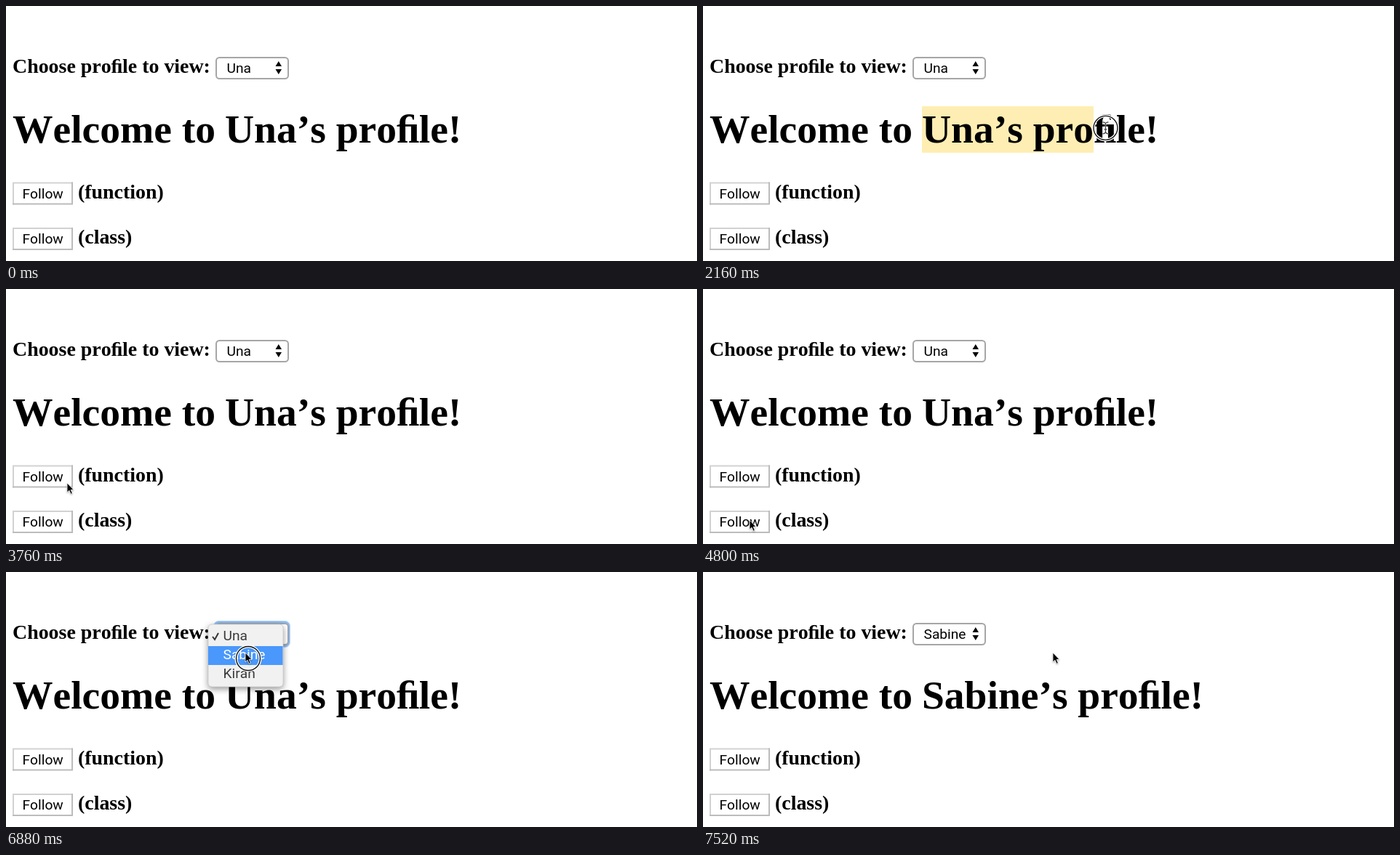
Recreate the animation shown at these times as an HTML page. Size 950 by 351 pixels, loop 8000 ms.

```html
<!DOCTYPE html>
<html lang="en">
<head>
<meta charset="utf-8">
<title>Profile page</title>
<style>
html, body { margin: 0; width: 100%; height: 100%; overflow: hidden; background: #fff; }
svg { display: block; }
text { font-kerning: none; }
.serif { font: bold 27.9px "Liberation Serif", Times, serif; }
.serif .title { font-size: 55.5px; }
.sans { font: 19.2px Roboto, Arial, sans-serif; }
.line { fill: none; stroke-width: 2; }
.glow { fill: #86bdfc; stroke: #b4d6fd; }
#menu { filter: drop-shadow(0 3px 4px #0006); }
#arrow { filter: drop-shadow(0 1px 1px #0005); }
</style>
</head>
<body>
<svg width="950" height="351" viewBox="0 0 950 351">
  <defs>
    <g id="button">
      <rect width="83" height="31" fill="#fff"/>
      <path class="line" d="M1 31V1H83" stroke="#d2d2d2"/>
      <path class="line" d="M0 30H82V0" stroke="#bcbcbc"/>
    </g>
    <path id="beamShape" d="M-4-8Q0-8 0-5V5Q0 8-4 8M4-8Q0-8 0-5V5Q0 8 4 8M-2 2H2"/>
  </defs>

  <rect id="mark" x="301" y="138" height="64" fill="#ffeeb3"/>
  <g class="serif">
    <text x="9" y="92">Choose proﬁle to view:</text>
    <text class="title" x="9" y="188">Welcome to</text>
    <text class="title" id="owner" x="301" y="188"></text>
    <text x="99" y="265">(function)</text>
    <text x="99" y="327">(class)</text>
  </g>

  <rect id="buttonGlow" class="glow" x="5" y="300.5" width="91" height="40" rx="6"/>
  <use href="#button" x="9" y="242.5"/>
  <use id="lower" href="#button"/>
  <rect id="inner" x="9" y="305" width="83" height="31" rx="1" fill="#fff"/>
  <rect id="selectGlow" class="glow" x="285.5" y="67.5" width="105" height="36" rx="7"/>
  <rect x="289" y="71" width="99" height="29" rx="4.5" fill="#fff" stroke="#a6a6a6" stroke-width="2"/>
  <path d="M370.5 83L374.8 76 379 83ZM370.5 87H379L374.8 94Z"/>
  <g class="sans">
    <text x="22.5" y="265">Follow</text>
    <text x="22.5" y="327">Follow</text>
    <text id="choice" x="303.5" y="92"></text>
  </g>

  <g id="menu" class="sans">
    <rect x="278" y="72" width="103" height="86" rx="5" fill="#f1f1f1" stroke="#c4c4c4" stroke-width=".7"/>
    <rect id="row" x="278" width="102.5" height="26" fill="#4a98fc"/>
    <path id="check" class="line" d="M284 89L287 93 292 84"/>
    <text class="item" x="298.5" y="94">Una</text>
    <text class="item" x="298.5" y="120">Sabine</text>
    <text class="item" x="298.5" y="146">Kiran</text>
  </g>

  <g id="cursor">
    <g id="ring" fill="none">
      <circle r="16.5" stroke="#fff" stroke-width="4"/>
      <circle r="16.5" stroke="#111" stroke-width="1.4"/>
    </g>
    <path id="arrow" d="M0 0V13L3 10.300 5.200 15.300 7.300 14.300 5.200 9.500H9Z" stroke="#fff" stroke-width=".8"/>
    <g id="beam" fill="none">
      <use href="#beamShape" stroke="#fff9" stroke-width="2.4"/>
      <use href="#beamShape" stroke="#444" stroke-width="1.2"/>
    </g>
  </g>
</svg>
<script>
const LOOP = 8000, STEP = 80;
const el = id => document.getElementById(id);
const items = document.querySelectorAll('.item');
const within = (v, a, b) => v >= a && v < b;
const show = (id, on) => el(id).style.display = on ? '' : 'none';
const easeOut = p => 1 - (1 - p) ** 2;

// Pointer moves: start time, end time, destination
const moves = [
  [240, 560, 452, 252],    // enter the page
  [640, 1520, 308, 167],   // to the name in the heading
  [1600, 2560, 605, 168],  // drag over it
  [3280, 3760, 84, 267],   // to the first button
  [3760, 4160, 42, 304],
  [4160, 4480, 50, 258],
  [4480, 4800, 64, 318],   // to the second button
  [5360, 6000, 331, 86],   // to the select
  [6320, 6800, 329, 111],  // to the second option
  [6960, 7200, 481, 111]   // leave
];
const presses = [[1520, 2800], [3120, 3200], [5280, 5440], [6800, 6960]];

function pointerAt(t) {
  let x = 540, y = 345;
  for (const [start, end, toX, toY] of moves) {
    const p = easeOut(Math.min(1, Math.max(0, (t - start) / (end - start))));
    x += (toX - x) * p;
    y += (toY - y) * p;
  }
  return [x, y];
}

// Right edge of the last heading letter the drag has passed
function markEnd(limit) {
  const owner = el('owner');
  let end = 301;
  for (let i = 0; i < owner.getNumberOfChars(); i++) {
    const edge = owner.getEndPositionOfChar(i).x;
    if (edge <= limit) end = edge;
  }
  return end;
}

function draw(t) {
  const [x, y] = pointerAt(t);
  const name = t < 7280 ? 'Una' : 'Sabine';
  el('owner').textContent = name + '’s proﬁle!';
  el('choice').textContent = name;

  const end = markEnd(t < 2640 ? x : Infinity);
  el('mark').setAttribute('width', within(t, 1680, 3200) ? end - 301 : 0);

  const focused = within(t, 5280, 6320), pressed = within(t, 5280, 5440);
  show('buttonGlow', focused);
  show('inner', focused && !pressed);
  el('lower').setAttribute('transform', pressed ? 'translate(92 336) rotate(180)' : 'translate(9 305)');
  show('selectGlow', within(t, 6320, 7440));

  const active = y < 102 ? 0 : 1;
  show('menu', within(t, 6320, 7360));
  el('menu').style.opacity = Math.min(1, (7440 - t) / 240);
  el('row').setAttribute('y', 76 + 26 * active);
  el('check').setAttribute('stroke', active ? '#333' : '#fff');
  items.forEach((item, i) => item.setAttribute('fill', i === active ? '#fff' : '#3a3a3a'));

  const overText = within(y, 138, 202) && within(x, 9, 628) ||
    within(y, 242, 274) && within(x, 99, 217);
  show('cursor', t >= 320);
  el('cursor').setAttribute('transform', `translate(${x} ${y})`);
  show('arrow', !overText);
  show('beam', overText);
  show('ring', presses.some(([a, b]) => within(t, a, b)));
  el('ring').setAttribute('transform', overText ? '' : 'translate(4 8)');
}

function tick(now) {
  draw(Math.floor(now % LOOP / STEP) * STEP);
  requestAnimationFrame(tick);
}
draw(0);
requestAnimationFrame(tick);
</script>
</body>
</html>
```
